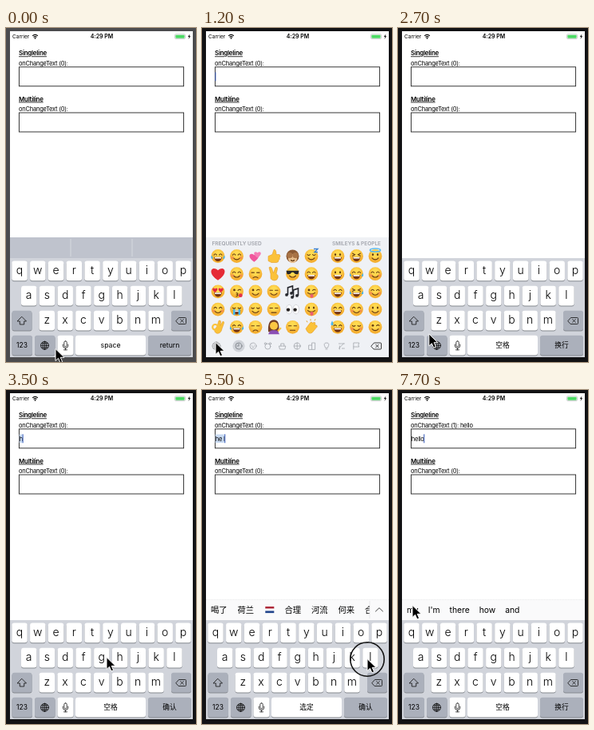
These frames come from a looping animation (238x418 px, 8 s). An HTML page:

```html
<!DOCTYPE html>
<html lang="en">
<head>
<meta charset="utf-8">
<title>Keyboard input demo</title>
<style>
html, body { margin: 0; width: 100%; height: 100%; overflow: hidden; background: #121214; }
svg { display: block; width: 238px; height: 418px; }
text { font-family: Inter, "Noto Sans CJK SC", "Noto Sans", sans-serif; fill: #000; white-space: pre; }
.ja text { font-family: "Noto Sans CJK JP", "Noto Sans CJK SC", sans-serif; }
.body { font-size: 7.5px; letter-spacing: -.03em; }
.title { font-size: 7.9px; font-weight: 600; letter-spacing: -.03em; text-decoration: underline; }
.line { fill: none; stroke: #111; stroke-width: .8; stroke-linecap: round; stroke-linejoin: round; }
.faint { stroke: #a3a6ad; }
.face { fill: none; stroke: #633a12; stroke-width: 1.1; stroke-linecap: round; }
.head { font-size: 6.5px; font-weight: 600; fill: #a0a3ab; }
</style>
</head>
<body>
<svg id="stage" viewBox="0 0 238 418"></svg>
<script>
const LOOP = 8000;
const GRAY = '#abb0bb', WHITE = '#fff', BOARD = '#d1d4db';

const rect = (x, y, w, h, fill, extra = '') =>
  `<rect x="${x}" y="${y}" width="${w}" height="${h}" fill="${fill}" ${extra}/>`;
const path = (d, extra = 'class="line"') => `<path d="${d}" ${extra}/>`;
const dot = (x, y, r, extra) => `<circle cx="${x}" cy="${y}" r="${r}" ${extra}/>`;
const text = (x, y, s, size, extra = '') => `<text x="${x}" y="${y}" font-size="${size}" ${extra}>${s}</text>`;
const label = (x, y, s, size, extra = '') => text(x, y + size * .36, s, size, `text-anchor="middle" ${extra}`);
const at = (x, y, s, extra = '') => `<g transform="translate(${x} ${y})" ${extra}>${s}</g>`;
const layer = (id, s, extra = '') => `<g id="${id}" ${extra}>${s}</g>`;
const key = (x, y, w, h, fill = WHITE, id = '') =>
  rect(x, y + .9, w, h, '#85898f', 'rx="3"') + rect(x, y, w, h, fill, `rx="3" ${id && `id="${id}"`}`);

// Icons, centred on the origin
const globe = dot(0, 0, 5, 'class="line"') +
  '<ellipse rx="2.3" ry="5" class="line"/>' + path('M-5 0H5M0 -5V5M-4.2 -2.6H4.2M-4.2 2.6H4.2');
const mic = rect(-1.7, -5.5, 3.4, 7, 'none', 'rx="1.7" class="line"') +
  path('M-3.3 -1.2V0a3.3 3.3 0 0 0 6.6 0V-1.2M0 3.4V5.5M-2 5.5H2');
const erase = path('M-6 0L-2.5 -4H5.5Q6.5 -4 6.5 -3V3Q6.5 4 5.5 4H-2.5ZM-.3 -1.8L3.3 1.8M3.3 -1.8L-.3 1.8');
const shift = path('M0 -5L5.5 .5H2.7V4.5H-2.7V.5H-5.5Z');

// Emoji: eyes + mouth + optional extras, or a named figure
const EYES = {
  o: '<ellipse cx="-3" cy="-2" rx="1.1" ry="1.5" fill="#633a12"/><ellipse cx="3" cy="-2" rx="1.1" ry="1.5" fill="#633a12"/>',
  '^': path('M-5 -1.4Q-3.3 -4 -1.6 -1.4M1.6 -1.4Q3.3 -4 5 -1.4', 'class="face"'),
  u: path('M-5 -2Q-3.3 0 -1.6 -2M1.6 -2Q3.3 0 5 -2', 'class="face"'),
  '-': path('M-5 -1.6H-1.6M1.6 -1.6H5', 'class="face"'),
  '>': path('M-5 -3.4L-2 -1.8L-5 -.3M5 -3.4L2 -1.8L5 -.3', 'class="face"'),
  w: dot(-3, -2, 1.4, 'fill="#633a12"') + path('M1.6 -1.6Q3.3 -3.4 5 -2', 'class="face"'),
  h: [-3.7, 3.7].map(x => at(x, -2, path('M0 3C-5 0 -3 -4 0 -1.5C3 -4 5 0 0 3Z', 'fill="#e3263e"'))).join(''),
  s: path('M-8 -4H8L7 0Q4 2 1 -2H-1Q-4 2 -7 0Z', 'fill="#25262b"')
};
const MOUTHS = {
  D: path('M-5 1.2H5Q4 6.5 0 6.5T-5 1.2Z', 'fill="#743514"') + rect(-4, 1.4, 8, 1.6, '#fff'),
  s: path('M-4 2.3Q0 6.4 4 2.3', 'class="face"'),
  f: path('M-3 5Q0 2.5 3 5', 'class="face"'),
  _: path('M-3 4H3', 'class="face"'),
  k: path('M-.5 1.6Q3 2.4 .2 3.7Q3 4.6 -.5 5.8', 'class="face"'),
  t: path('M-4.5 1.5Q0 5 4.5 1.5', 'class="face"') + rect(-1.5, 3, 4, 4.8, '#ed5f70', 'rx="2"')
};
const EXTRAS = {
  T: path('M-8 -1Q-10 4 -6 3ZM8 -1Q10 4 6 3Z', 'fill="#40b4ef"'),
  b: dot(-5.4, 2, 1.8, 'fill="#f38a52" opacity=".75"') + dot(5.4, 2, 1.8, 'fill="#f38a52" opacity=".75"'),
  q: path('M-7 -8Q-10 -2 -7 -2T-7 -8Z', 'fill="#48b7ee"'),
  z: path('M3 -9H8L4 -5H8', 'fill="none" stroke="#3e82d0" stroke-width="1.3"'),
  H: '<ellipse cy="-7.5" rx="6.5" ry="2" fill="none" stroke="#58b9ee" stroke-width="1.7"/>',
  v: dot(4.8, 4.8, 2.4, 'fill="#e4314b"'),
  r: path('M-4.5 0H-2V7H-4.5ZM2 0H4.5V7H2Z', 'fill="#48b7ee"')
};
const heart = fill => path('M0 8C-15 -2 -7 -11 0 -4.5C7 -11 15 -2 0 8Z', `fill="${fill}"`);
const skin = 'fill="#fbc239" stroke="#e59b25" stroke-width=".6" stroke-linejoin="round"';
const FIGURES = {
  heart: heart('#e52a35'),
  hearts: at(-2.5, 2.5, heart('#f0569c'), 'style="scale:.68"') + at(5, -4, heart('#f67bb5'), 'style="scale:.5"'),
  thumb: path('M-7 0L-2 -2L0 -8Q3 -9 3 -2H7Q9 0 7 2Q8 4 6 5Q6 8 3 8H-3L-7 6Z', skin),
  monkey: dot(0, 0, 8, 'fill="#8b5a34"') + dot(0, 3, 5.5, 'fill="#e6bd8c"') +
    dot(-3.5, -1, 3.6, 'fill="#a87345"') + dot(3.5, -1, 3.6, 'fill="#a87345"') + path('M-2 5Q0 7 2 5', 'class="face"'),
  peace: path('M-4 0L-6 -8Q-4 -10 -2.5 -7L-.6 -1L2 -8Q5 -9 4.5 -6L3 0Q7 2 4 7Q0 10 -4 6Z', skin),
  notes: path('M-6 4V-5L0 -7V2M1 7V-2L7 -4V5', 'fill="none" stroke="#25272d" stroke-width="1.6"') +
    [[-7.5, 4], [-1.5, 2], [-.5, 7], [5.5, 5]].map(p => dot(...p, 1.9, 'fill="#25272d"')).join(''),
  look: [-4.3, 4.3].map(x => `<ellipse cx="${x}" rx="3.7" ry="5.8" fill="#fff" stroke="#c8c9cf" stroke-width=".7"/>` +
    dot(x - 1.2, .5, 2.2, 'fill="#24201f"')).join(''),
  ok: path('M-1 -1L1 -8Q3 -9 3.5 -7L3 -2L6 -7Q8 -7 7.5 -5L5 2Q4 8 -1 8Q-5 7 -4 3Z', skin) +
    dot(-3.5, 0, 3.3, 'fill="none" stroke="#fbc239" stroke-width="2.2"'),
  girl: path('M-7 6Q-8 -9 0 -9T6 6Z', 'fill="#743e27"') + dot(0, -1.5, 5, 'fill="#fbc743"') +
    path('M-7 9Q-5 3 0 4Q5 3 7 9Z', 'fill="#8b4fb5"') + path('M5 5L9 1', 'stroke="#fbc743" stroke-width="2"'),
  clap: path('M-7 2L-1 -6Q1 -7 1 -5L4 -6Q6 -5 4 -3L7 -2Q8 0 6 1L1 7Q-4 10 -7 2Z', skin) +
    path('M-5 -6L-6 -8M-1 -8V-10M4 -8L5 -10', 'stroke="#e2a129"')
};
const emoji = code => FIGURES[code] || dot(0, 0, 8.4, 'fill="url(#sun)"') +
  EYES[code[0]] + MOUTHS[code[1]] + [...code.slice(2)].map(c => EXTRAS[c]).join('');

const EMOJI_ROWS = [
  '^DT ^sb hearts thumb monkey usz oD >D osH',
  'heart ^sb -f peace ss ^D oD ^DT ^sb',
  'hsb wkv ws -s notes wt ^D >DT ^sb',
  '^sb urD us -_ look ot ^D ^sb os',
  'ok ^DT -f girl -_ clap ^Dq usb ws'
].map(row => row.replace('urD', 'uDr').replace('hsb', 'hD').split(' '));
const EMOJI_X = [20, 43.5, 67, 90, 113.5, 137, 170, 193.5, 217];

function emojiBoard() {
  const grid = EMOJI_ROWS.map((row, r) =>
    row.map((code, c) => at(EMOJI_X[c], 285.5 + 22.2 * r, emoji(code))).join('')).join('');
  const icons = [
    dot(0, 0, 4, 'class="line faint"') + path('M-1.5 1Q0 2.5 1.5 1M-1.5 -1V-.8M1.5 -1V-.8', 'class="line faint"'),
    dot(0, .5, 3.5, 'class="line faint"') + dot(-3, -3, 1.2, 'class="line faint"') + dot(3, -3, 1.2, 'class="line faint"'),
    path('M-4 0H4L3 4H-3ZM-2 0V-3H2V0', 'class="line faint"'),
    dot(0, 0, 4, 'class="line faint"') + path('M0 -4V4M-4 0H4', 'class="line faint"'),
    path('M-4 4V-1H0V-4H4V4ZM0 -1V4', 'class="line faint"'),
    path('M-1.5 2Q-5 -4 0 -4T1.5 2ZM-1 4H1', 'class="line faint"'),
    path('M-3 -3H0M1 -3H4M-3 3L3 -3M1 3H4M-2 0V4', 'class="line faint"'),
    path('M-3 4V-4H4L3 -1L4 1H-3', 'class="line faint"')
  ].map((s, i) => at(64 + 18.4 * i, 398, s)).join('');
  return rect(5, 262, 229, 150, '#eff1f5') +
    text(12.5, 272, 'FREQUENTLY USED', 6.5, 'class="head"') +
    text(163, 272, 'SMILEYS &amp; PEOPLE', 6.5, 'class="head"') + grid +
    at(18, 398, globe, 'opacity=".35"') + dot(46, 398, 7.6, 'fill="#d0d3d9"') +
    dot(46, 398, 4, 'class="line" style="stroke:#777b83"') + path('M46 395.5V398H44', 'class="line" style="stroke:#777b83"') +
    icons + at(218, 398, erase);
}

function letterBoard() {
  const row = (letters, x, y) => [...letters].map((c, i) =>
    key(x + 22.78 * i - 9.7, y, 19.4, 24.8) + label(x + 22.78 * i, y + 11.6, c, 14, 'font-weight="350"')).join('');
  return rect(5, 288, 229, 124, BOARD) +
    row('qwertyuiop', 17, 291.5) + row('asdfghjkl', 28.7, 322.7) + row('zxcvbnm', 51.3, 353.8) +
    key(7.5, 353.8, 25, 24.8, GRAY) + at(20, 366.5, shift) +
    key(207, 353.8, 25, 24.8, GRAY) + at(219, 366.5, erase) +
    key(7.5, 384.8, 25.5, 24.8, GRAY) + label(20, 397, '123', 8.5) +
    key(36, 384.8, 25.5, 24.8, GRAY) + at(48.5, 397.3, globe) +
    key(64.5, 384.8, 20, 24.8) + at(74.5, 397.3, mic) +
    key(87, 384.8, 88, 24.8) + label(131, 397, '', 8.7, 'id="space"') +
    key(178, 384.8, 54, 24.8, GRAY) + label(205, 397, '', 8.7, 'id="enter"');
}

function kanaBoard() {
  const cols = [7, 53, 98.7, 144.5, 190.5], rows = [291, 321.8, 352.5, 383.3], w = 42.3, h = 27;
  const kana = ['あかさ', 'たなは', 'まやら'].map((s, r) => [...s].map((c, i) =>
    key(cols[i + 1], rows[r], w, h) + label(cols[i + 1] + w / 2, rows[r] + 13, c, 12)).join('')).join('');
  return rect(5, 288, 229, 124, BOARD) + kana +
    rows.slice(0, 3).map(y => key(7, y, w, h, GRAY)).join('') +
    at(28, 304.5, path('M-5 0H5M2 -3L5 0L2 3', 'class="line" style="stroke:#858a94"')) +
    at(28, 335, path('M-2 -5L-5 -2L-2 1M-5 -2H2A3 3 0 0 1 2 4H-4', 'class="line" style="stroke:#858a94"')) +
    label(28, 366, 'ABC', 9, 'style="font-family:Inter,sans-serif"') +
    key(7, 383.3, 20, h) + at(16.5, 396.5, globe) +
    key(30.5, 383.3, 18.8, h, GRAY) + at(39.8, 396.5, mic) +
    key(53, 383.3, 133.8, h) + label(120, 396.5, '日本語かな', 8.5, 'letter-spacing="1"') +
    key(190.5, 291, 41.7, h, GRAY) + at(211, 304.5, erase) +
    key(190.5, 321.8, 41.7, h, GRAY) + label(211, 335, '空白', 8.7) +
    key(190.5, 352.5, 41.7, 57.8, GRAY) + label(211, 381.5, '改行', 8.7);
}

function field(y, title, ids) {
  return text(16, y, title, 8, 'class="title"') +
    text(16, y + 12.3, 'onChangeText (0):', 8, `class="body" id="${ids}"`) +
    rect(16.4, y + 14.4, 206.2, 24, 'none', 'stroke="#222" stroke-width=".9"');
}

const stage = document.getElementById('stage');
stage.innerHTML = `<defs>
  <radialGradient id="sun" cy=".35"><stop offset=".4" stop-color="#ffda50"/><stop offset="1" stop-color="#f5b032"/></radialGradient>
  <clipPath id="screen"><rect x="5" y="4" width="229" height="408"/></clipPath>
  <clipPath id="words"><rect x="5" y="262" width="205" height="26"/></clipPath></defs>` +
  layer('frame', rect(0, 0, 238, 418, 'inherit')) +
  `<g clip-path="url(#screen)">` + rect(5, 4, 229, 408, WHITE) +
  text(8, 13.2, 'Carrier', 6.5) +
  path('M33.2 9.8Q36.5 7 39.8 9.8M34.5 11.4Q36.5 9.8 38.5 11.4', 'fill="none" stroke="#000" stroke-width="1.2"') + dot(36.5, 12.8, .9, '') +
  label(120, 10.8, '4:29 PM', 7, 'font-weight="600"') +
  rect(211.5, 7.8, 13, 5.8, 'none', 'rx="1.4" stroke="#a9aaad" stroke-width=".6"') +
  rect(212.4, 8.7, 11.2, 4, '#4cd964', 'rx=".8"') + path('M230.4 7.5L227.8 11H229.4L228.4 14L231.2 10.2H229.6Z', '') +
  field(34.4, 'Singleline', 'status') + field(91.6, 'Multiline', 'status2') +
  rect(16.6, 55.5, 0, 10.6, '#c8daf2', 'id="mark"') + text(16.8, 63.7, '', 8, 'class="body" id="typed"') +
  rect(16.5, 55.3, 1, 11, '#3357b8', 'id="caret"') +
  layer('letters', letterBoard()) +
  layer('predict', rect(5, 262, 229, 26, '#bfc3cd') + path('M81 264V286M158 264V286', 'stroke="#d6d9df"')) +
  layer('bar', rect(5, 262, 229, 26, '#fafafb') + path('M5 262.3H234', 'stroke="#d8dadd" stroke-width=".6" stroke-dasharray="1 1"') +
    `<g id="list" clip-path="url(#words)"></g>` +
    layer('chevron', path('M210 264V286', 'stroke="#dedfe3" stroke-width=".7"') + at(222, 275, path('M-4.5 2L0 -2.3L4.5 2')))) +
  layer('kana', kanaBoard(), 'class="ja"') + layer('emoji', emojiBoard()) + '</g>' +
  layer('pointer', dot(0, 0, 21.2, 'id="ring" fill="none" stroke="#111" stroke-width="1.6"') +
    path('M0 -.5V14.5L3.5 11.3L5.9 16.8L8.6 15.6L6.2 10.3H11Z', 'fill="#000" stroke="#fff" stroke-width="1" stroke-linejoin="round"'));

const ui = {};
stage.querySelectorAll('[id]').forEach(el => ui[el.id] = el);

// [time, x, y]
const MOVES = [[0, 62, 402], [800, 48, 397], [1000, 48, 397], [1200, 17, 394], [1500, 13, 395], [2500, 13, 395],
  [3200, 142, 337], [3400, 140, 337], [3500, 126, 335], [4100, 62, 306], [4400, 62, 306], [4900, 194, 340],
  [5000, 194, 340], [5200, 207, 337], [5900, 207, 337], [6400, 189, 305], [6500, 197, 309], [7000, 197, 309],
  [7300, 18, 270], [8000, 18, 270]];
const RINGS = [[850, 1050], [1780, 1950], [3250, 3450], [4180, 4380], [5380, 5600], [5780, 5980], [6480, 6690], [7350, 7580]];
// Each entry also restarts the caret blink
const STEPS = [
  { t: 0, board: 'letters', space: 'space', enter: 'return', predict: true },
  { t: 1080, board: 'emoji' },
  { t: 1880, board: 'kana' },
  { t: 2080, board: 'letters', space: '空格', enter: '换行' },
  { t: 3380, typed: 'h', enter: '确认', space: '空格' },
  { t: 3580, typed: 'h', words: '和 好 会 还 很 后 或 化 行' },
  { t: 4280, typed: 'he', words: '和 喝 合 河 呵呵 何 核 荷' },
  { t: 5480, typed: 'he l', words: '喝了 荷兰 * 合理 河流 何来 合力' },
  { t: 5880, typed: 'he l l', words: '乔映禾 核力量 hell 喝了 荷兰 合理' },
  { t: 6580, typed: 'he l l o', words: 'hello 核力量 喝了 荷兰 合理 河流' },
  { t: 7380, typed: 'hello', done: true, words: "my I'm there how and", space: '空格', enter: '换行' }
];

const show = (el, on) => el.style.display = on ? '' : 'none';

function setWords(words, gap) {
  ui.list.innerHTML = '';
  let x = 11;
  for (const word of words.split(' ')) {
    if (word === '*') {
      ui.list.innerHTML += ['#ae2938', '#fff', '#24478d'].map((c, i) => rect(x + 1.5, 271 + 2.7 * i, 11, 2.7, c)).join('');
      x += 13 + gap;
    } else {
      ui.list.insertAdjacentHTML('beforeend', text(x, 278.8, word, 10.3));
      x += ui.list.lastChild.getComputedTextLength() + gap;
    }
  }
}

let current;
function applyStep(step) {
  current = step;
  const board = step.board || 'letters';
  ['letters', 'kana', 'emoji'].forEach(id => show(ui[id], id === board));
  show(ui.predict, step.predict);
  show(ui.bar, step.words);
  show(ui.chevron, !step.done);
  ui.space.textContent = step.space || '选定';
  ui.enter.textContent = step.enter || '确认';
  ui.typed.textContent = step.typed || '';
  ui.status.textContent = step.done ? 'onChangeText (1): hello' : 'onChangeText (0):';
  const width = step.typed ? ui.typed.getComputedTextLength() : 0;
  ui.mark.setAttribute('width', step.done ? 0 : width);
  ui.caret.setAttribute('x', 16.4 + width);
  if (step.words) setWords(step.words, step.done ? 12 : 12.8);
}

function pointerAt(t) {
  const i = MOVES.findIndex(m => m[0] > t), [t0, x0, y0] = MOVES[i - 1], [t1, x1, y1] = MOVES[i];
  const p = (t - t0) / (t1 - t0), e = p * p * (3 - 2 * p);
  return [x0 + (x1 - x0) * e, y0 + (y1 - y0) * e];
}

function update(t) {
  const step = STEPS.findLast(s => s.t <= t);
  if (step !== current) applyStep(step);
  const shade = Math.round(75 - 57 * Math.min(1, t / 900));
  ui.frame.setAttribute('fill', `rgb(${shade},${shade},${shade + 2})`);
  show(ui.caret, t > 900 && (t - step.t) % 1000 < 510);
  ui.pointer.setAttribute('transform', `translate(${pointerAt(t)})`);
  show(ui.ring, RINGS.some(([a, b]) => t >= a && t < b));
}

const start = performance.now();
function tick() {
  update((performance.now() - start) % LOOP);
  requestAnimationFrame(tick);
}
tick();
</script>
</body>
</html>
```
